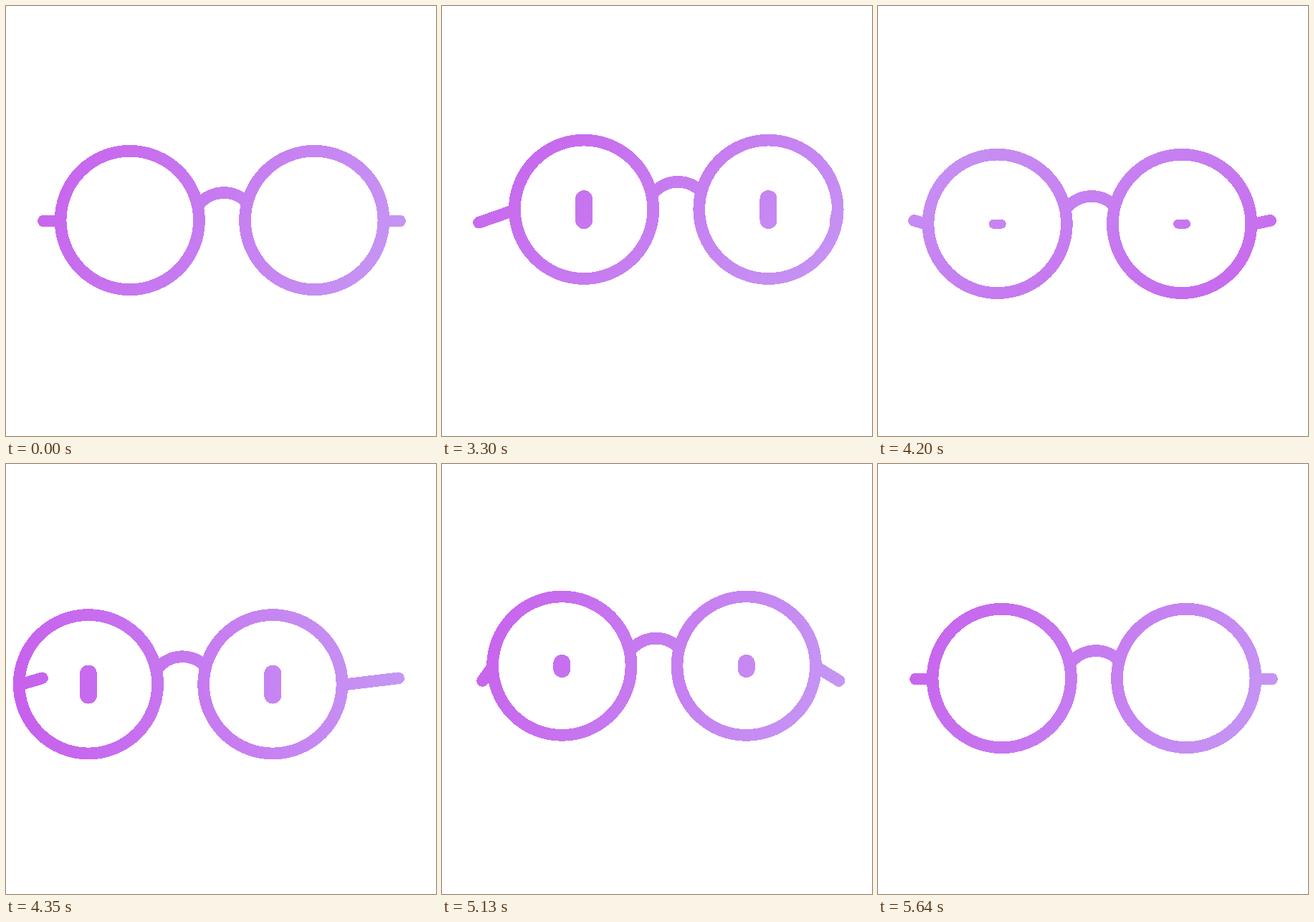
An HTML page that plays this animation: 600 by 600 pixels, repeating every 5.67 s.

```html
<!DOCTYPE html>
<html lang="en">
<head>
<meta charset="utf-8">
<title>Glasses</title>
<style>
  html, body { margin: 0; width: 100%; height: 100%; overflow: hidden; background: #fff; }
  svg { display: block; width: 100%; height: 100%; }
</style>
</head>
<body>
<svg viewBox="0 0 600 600" shape-rendering="crispEdges">
  <defs>
    <linearGradient id="tint" gradientUnits="userSpaceOnUse" x1="-30" y1="300" x2="630" y2="300">
      <stop offset="0" stop-color="#c85cec"/>
      <stop offset="1" stop-color="#c59ef5"/>
    </linearGradient>
  </defs>
  <g fill="none" stroke="url(#tint)" stroke-width="16.7">
    <path id="frame"/>
    <path id="temples" stroke-linecap="round"/>
  </g>
  <g fill="url(#tint)">
    <rect class="eye" width="24"/>
    <rect class="eye" width="24"/>
  </g>
</svg>
<script>
const LOOP = 5670, STEP = 30;
const REST_X = 172.8, REST_Y = 299, LOOK = 69.3;
const LENS_GAP = 257.4, RADIUS = 96.7, EYE_HEIGHT = 54;

const byId = id => document.getElementById(id);
const eyes = document.querySelectorAll('.eye');

// Eased progress from 0 to 1 between two times.
function progress(time, from, to) {
  const p = Math.min(1, Math.max(0, (time - from) / (to - from)));
  return p * p * (3 - 2 * p);
}

// Rises from 0 to 1 and falls back, with its peak halfway.
const pulse = (time, from, to) =>
  Math.sin(Math.PI * Math.min(1, Math.max(0, (time - from) / (to - from))));

function poseAt(time) {
  const during = (from, to) => progress(time, from, to);
  const lookRight = during(3217, 3420);
  const swingLeft = during(3930, 4440);
  const comeBack = during(4890, 5180);

  const hop = 34 * (during(3000, 3150) - during(3150, 3430));
  const dip = 9 * swingLeft;
  const leap = 42 * during(4890, 5300) - 44 * during(5300, 5470) + 11 * during(5470, 5640);
  const y = REST_Y - hop + dip - leap;

  const open = during(3000, 3100) - during(5060, 5220);
  const blink = during(4080, 4200) - during(4200, 4320);

  return {
    x: REST_X + LOOK * (lookRight - 2 * swingLeft + comeBack),
    y,
    eye: EYE_HEIGHT * (open - 0.76 * blink),
    tipX: 2 * (comeBack - lookRight) + 4.7 * pulse(time, 4890, 5500),
    tipY: 0.14 * (REST_Y - y),
    angle: 25 + 50 * lookRight + 300 * swingLeft + 10 * during(4890, 5640)
  };
}

const ring = (x, y) =>
  `M${x - RADIUS} ${y}a${RADIUS} ${RADIUS} 0 1 1 ${2 * RADIUS} 0a${RADIUS} ${RADIUS} 0 1 1 ${-2 * RADIUS} 0z`;

function draw(time) {
  const { x, y, eye, tipX, tipY, angle } = poseAt(time);
  const right = x + LENS_GAP;

  const bridge = `M${x + 95.2} ${y - 20.5}A45 45 0 0 1 ${x + 163.2} ${y - 25.1}`;
  byId('frame').setAttribute('d', ring(x, y) + ring(right, y) + bridge);

  const tipLevel = 300 + tipY;
  byId('temples').setAttribute('d',
    `M${52.4 + tipX} ${tipLevel}L${x - RADIUS} ${y + 1}` +
    `M${549.6 + tipX} ${tipLevel}L${right + RADIUS} ${y + 1}`);

  eyes.forEach((el, i) => {
    el.setAttribute('x', x + i * LENS_GAP - 12);
    el.setAttribute('y', y + 0.3 - eye / 2);
    el.setAttribute('height', eye);
    el.setAttribute('rx', Math.min(12, eye / 2));
  });

  byId('tint').setAttribute('gradientTransform', `rotate(${angle} 300 300)`);
}

const start = performance.now();
function tick() {
  const time = (performance.now() - start) % LOOP;
  draw(Math.floor(time / STEP) * STEP);
  requestAnimationFrame(tick);
}
draw(0);
requestAnimationFrame(tick);
</script>
</body>
</html>
```
